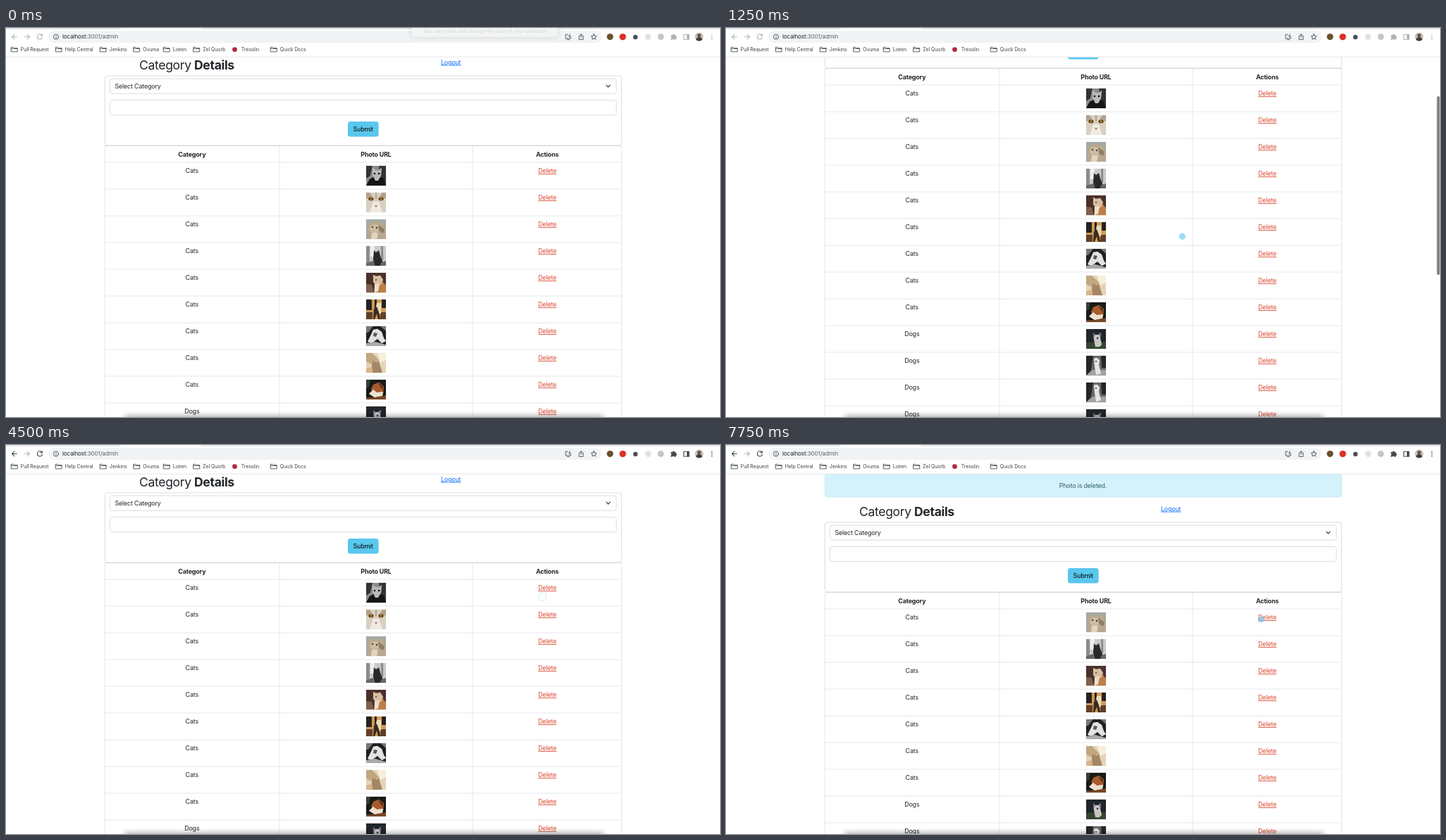
These frames come from a looping animation (1013 px wide and 553 px high, 8000 ms). An HTML page:

```html
<!DOCTYPE html>
<html lang="en">
<head>
<meta charset="utf-8">
<title>Category admin</title>
<style>
html, body { margin: 0; width: 100%; height: 100%; overflow: hidden; background: #fff; }
svg { display: block; width: 1013px; height: 553px; }
text { font: 400 8.9px Inter, sans-serif; letter-spacing: -.15px; fill: #212529; white-space: pre; }
.mid { text-anchor: middle; }
.bold { font-weight: 700; }
.link { text-decoration: underline; }
.title { font-size: 17.6px; letter-spacing: -.35px; }
.url { font-size: 8.1px; letter-spacing: -.12px; }
.mark { font-size: 6.9px; letter-spacing: -.05px; fill: #3c4043; }
.line { fill: none; stroke: #dee2e6; stroke-width: .8; }
.box { fill: #fff; stroke: #d0d5da; stroke-width: .8; }
.icon { fill: none; stroke: currentColor; stroke-width: 1.1; stroke-linecap: round; stroke-linejoin: round; }
#chrome { color: #4b4f54; }
</style>
</head>
<body>
<svg id="stage" viewBox="0 0 1013 553" xmlns="http://www.w3.org/2000/svg">
<defs>
  <clipPath id="view"><rect y="41.5" width="1013" height="512"/></clipPath>
  <filter id="soft"><feGaussianBlur stdDeviation=".45"/></filter>
  <filter id="shade" x="-10%" y="-100%" width="120%" height="300%"><feGaussianBlur stdDeviation="4"/></filter>

  <symbol id="p0" viewBox="0 0 28 28"><rect width="28" height="28" fill="#8b8b8b"/><g filter="url(#soft)">
    <path fill="#333" d="M0 0H9L6 14 0 18ZM18 0H28V28H22Z"/><path fill="#151515" d="M0 28 5 19 12 15 24 17 28 28Z"/>
    <path fill="#b9b9b9" d="M9 2 13 6H18L22 3 21 14 17 21H13L9 13Z"/><circle cx="12" cy="11" r="1.3"/><circle cx="18" cy="11" r="1.3"/></g></symbol>
  <symbol id="p1" viewBox="0 0 28 28"><rect width="28" height="28" fill="#d9cfc1"/><g filter="url(#soft)">
    <path fill="#b3a18b" d="M0 0H5L9 6 0 9ZM28 0H23L19 6 28 9ZM13 0H15V9H13Z"/><path fill="#f0ebe2" d="M10 13H18L23 28H5Z"/>
    <ellipse cx="7" cy="9" rx="3.6" ry="2.4" fill="#5b4019"/><ellipse cx="21" cy="9" rx="3.6" ry="2.4" fill="#5b4019"/>
    <circle cx="7" cy="9" r="1.3" fill="#c59436"/><circle cx="21" cy="9" r="1.3" fill="#c59436"/><path fill="#a66c5d" d="M12 18H16L14 21Z"/></g></symbol>
  <symbol id="p2" viewBox="0 0 28 28"><rect width="28" height="28" fill="#a3aaa5"/><g filter="url(#soft)">
    <path fill="#b9a88c" d="M4 28 2 16 5 5 12 3 22 5 28 11V28Z"/><ellipse cx="12" cy="13" rx="7" ry="6" fill="#cbbda5"/>
    <path fill="#8f7d63" d="M17 8 26 14 24 20 18 16Z"/><circle cx="9" cy="11" r="1.2" fill="#4c3c25"/><circle cx="15" cy="12" r="1.2" fill="#4c3c25"/><path fill="#e0d5c2" d="M8 19 17 19 15 28H7Z"/></g></symbol>
  <symbol id="p3" viewBox="0 0 28 28"><rect width="28" height="28" fill="#c9c9c9"/><g filter="url(#soft)">
    <path fill="#8c8c8c" d="M0 0H5V28H0ZM21 0H24V20H21Z"/><path fill="#eee" d="M6 0H12V15H6Z"/>
    <path fill="#292929" d="M11 6 14 9 18 6 20 14 24 24 19 28H12L10 19Z"/><path fill="#666" d="M0 24 10 21 13 28H0ZM21 23 28 21V28H20Z"/></g></symbol>
  <symbol id="p4" viewBox="0 0 28 28"><rect width="28" height="28" fill="#4b302a"/><g filter="url(#soft)">
    <path fill="#80604e" d="M0 16 8 17 11 28H0Z"/><path fill="#bc7f49" d="M11 28 12 16 23 12 28 18V28Z"/>
    <path fill="#d9bfa2" d="M10 3 14 5 20 4 24 10 21 17 14 18 10 13Z"/><path fill="#ede0ce" d="M12 16 19 15 17 26 12 28Z"/><circle cx="14" cy="10" r="1" fill="#453325"/></g></symbol>
  <symbol id="p5" viewBox="0 0 28 28"><rect width="28" height="28" fill="#cf9c55"/><g filter="url(#soft)">
    <path fill="#25211f" d="M0 0H8V15H0ZM12 0H15V13H12ZM22 0H28V12H22Z"/><path fill="#5f4028" d="M0 18H9V28H0ZM20 18H28V28H20Z"/>
    <path fill="#eadbb9" d="M15 5H21V20H12Z"/><path fill="#3a2a20" d="M11 13 15 10 18 18 20 28H17L15 20 12 28H10Z"/></g></symbol>
  <symbol id="p6" viewBox="0 0 28 28"><rect width="28" height="28" fill="#202020"/><g filter="url(#soft)">
    <path fill="#777" d="M0 0H10L3 9H0ZM20 0H28V7Z"/><path fill="#e2e2e2" d="M7 12 10 5 16 4 22 8 25 17 28 21 22 24 16 18 8 24 2 22Z"/>
    <path fill="#aaa" d="M0 24 13 22 28 26V28H0Z"/><path fill="#555" d="M11 9 16 10 14 15 10 14Z"/></g></symbol>
  <symbol id="p7" viewBox="0 0 28 28"><rect width="28" height="28" fill="#e4d3b5"/><g filter="url(#soft)">
    <path fill="#c0a681" d="M0 0H8L18 10 10 17 0 12Z"/><path fill="#f7eedb" d="M15 0H28V10L20 14Z"/>
    <path fill="#a68567" d="M9 28 8 18 10 11 14 14 18 11 20 19 23 28Z"/><path fill="#d6b586" d="M0 22 8 20 9 28H0Z"/></g></symbol>
  <symbol id="p8" viewBox="0 0 28 28"><rect width="28" height="28" fill="#171b17"/><g filter="url(#soft)">
    <path fill="#344330" d="M0 0H6L4 10 0 12Z"/><path fill="#a75b2d" d="M7 14 10 7 18 4 25 9 24 19 16 22Z"/>
    <path fill="#eee0ce" d="M4 20 10 14 15 18 24 17 23 23 12 25Z"/><path fill="#53301e" d="M17 5 24 9 23 14Z"/><path fill="#774728" d="M0 25 12 25 28 22V28H0Z"/></g></symbol>
  <symbol id="p9" viewBox="0 0 28 28"><rect width="28" height="28" fill="#20262b"/><g filter="url(#soft)">
    <path fill="#34462e" d="M0 19 28 18V28H0Z"/><path fill="#c9c5c5" d="M10 6 13 8 17 8 21 5 20 13 22 22 19 25H13L11 15Z"/>
    <path fill="#786a80" d="M10 5 13 8 11 12ZM21 5 18 8 20 12Z"/><circle cx="16" cy="13" r="1.3" fill="#363039"/></g></symbol>
  <symbol id="p10" viewBox="0 0 28 28"><rect width="28" height="28" fill="#68686a"/><g filter="url(#soft)">
    <path fill="#252628" d="M0 0H10L7 21 0 28ZM21 0H28V17H22Z"/><path fill="#a1a1a1" d="M0 28 9 20H28V28Z"/>
    <path fill="#e6e5e2" d="M11 4 15 3 19 6 18 13 21 25 14 27 12 15Z"/><circle cx="14" cy="8" r="1" fill="#292929"/></g></symbol>
</defs>
<rect width="1013" height="553" fill="#fff"/>

<g clip-path="url(#view)">
  <g id="alert">
    <rect x="140.3" y="41.6" width="733.2" height="32.2" rx="3.5" fill="#d4f2fb" stroke="#bde8f4" stroke-width=".8"/>
    <text class="mid" x="506.5" y="61" style="fill:#2f5c68">Photo is deleted.</text>
  </g>
  <g id="page">
    <text class="title" x="189" y="59">Category</text>
    <text class="title bold" x="267" y="59">Details</text>
    <text class="link" x="617" y="51.6" style="fill:#0d6efd">Logout</text>
    <rect class="box" x="140.3" y="68" width="733.2" height="99" rx="3.5"/>
    <rect class="box" x="147.5" y="72" width="718.5" height="21.2" rx="3.5"/>
    <text x="154.5" y="85.9">Select Category</text>
    <path class="icon" d="M851.7 81.2 854.4 84 857.1 81.2" style="color:#343a40"/>
    <rect class="box" x="147.5" y="102.5" width="718.5" height="21.2" rx="3.5"/>
    <rect x="485" y="133" width="43.6" height="21.5" rx="3.5" fill="#5ac7ed"/>
    <text class="mid" x="506.7" y="147" style="fill:#000">Submit</text>
    <g id="table"></g>
  </g>
</g>
<rect x="168" y="552" width="680" height="9" rx="4" fill="#000" opacity=".42" filter="url(#shade)"/>
<rect id="bar" x="1008.6" width="4" height="254" rx="2" fill="#7f7f7f"/>

<g id="chrome">
  <rect width="1013" height="1.6" fill="#dee1e6"/><rect x="163" width="114" height="1.6" fill="#fff"/>
  <rect x="60" y="4" width="785" height="17" rx="8.5" fill="#f1f3f4"/>
  <path d="M0 41.2H1013" stroke="#dfe1e4" stroke-width=".8"/>
  <g class="live icon">
    <path id="back" d="M15.4 12.5H8.6M11.8 9.2 8.5 12.5 11.8 15.8"/>
    <path d="M50.7 10A3.6 3.6 0 1 0 51.5 13.3M51.3 8.6V10.9H49"/>
  </g>
  <path class="icon" style="color:#b3b6ba" d="M26.6 12.5H33.4M30.2 9.2 33.5 12.5 30.2 15.8"/>
  <g class="icon" style="stroke-width:.9">
    <circle cx="71" cy="12.6" r="3.6"/><path d="M71 12.3V14.4M71 10.7V10.8"/>
    <path d="M797 9.3H794V15H801.3V13.2M796.2 16.7H799.2M799.8 8.8V12.5M798.2 11.2 799.8 12.8 801.4 11.2"/>
    <path d="M814.2 11.2H813V16.4H819V11.2H817.8M816 13.6V8.6M814.4 10.1 816 8.5 817.6 10.1"/>
    <path d="M834 8.6 835.2 11.2 838 11.5 835.9 13.3 836.5 16.1 834 14.7 831.5 16.1 832.1 13.3 830 11.5 832.8 11.2Z"/>
  </g>
  <text class="url" x="80" y="15.4">localhost<tspan fill="#5f6368">:3001/admin</tspan></text>
  <circle cx="857" cy="12.6" r="4.6" fill="#66512e"/>
  <circle cx="875" cy="12.6" r="4.7" fill="#dc2f25"/>
  <circle cx="893" cy="13" r="3.2" fill="#4c5055"/>
  <circle cx="911" cy="12.6" r="4.3" fill="#e0e2e5"/>
  <circle cx="929" cy="12.6" r="4.5" fill="#c3c5c8"/>
  <g class="live">
    <path fill="currentColor" d="M943.3 10H945.5A1.5 1.5 0 0 1 948.5 10H950.4V12A1.5 1.5 0 0 1 950.4 15V16.8H948.3A1.5 1.5 0 0 0 945.4 16.8H943.3V14.7A1.5 1.5 0 0 0 943.3 12Z"/>
    <path class="icon" d="M961.7 9.2H969V16.2H961.7Z"/><path fill="currentColor" d="M966 9H969.2V16.4H966Z"/>
    <g fill="currentColor"><circle cx="1001.5" cy="9.6" r=".9"/><circle cx="1001.5" cy="12.6" r=".9"/><circle cx="1001.5" cy="15.6" r=".9"/></g>
  </g>
  <circle cx="983.4" cy="12.6" r="6" fill="#c9c0bc"/>
  <path fill="#453b3a" d="M978.8 16.4Q980 13 983.4 13T988 16.4A6 6 0 0 1 978.8 16.4Z"/><circle cx="983.4" cy="10.6" r="2.6" fill="#6b554b"/>
  <g id="marks"></g>
</g>

<g id="toast">
  <rect x="575" y="-12" width="208" height="25" rx="5" fill="#000" opacity=".12" filter="url(#shade)"/>
  <rect x="575" y="-12" width="208" height="25" rx="5" fill="#f3f4f5" stroke="#e6e7e9" stroke-width=".6"/>
  <text class="mid" x="679.5" y="6.6" style="font-size:7.1px;letter-spacing:0;fill:#d3d5d8">You can move and change the size of your selection</text>
</g>
<circle id="ring" fill="#fff" stroke="#b4e0f2" stroke-width=".8"/>
<circle id="dot" r="4.6" fill="#5bc3ee"/>
</svg>
<script>
const LOOP = 8000, STEP = 250, CATS = 9, PHOTOS = 11, ROWS = 21;
const TOP = 191, ROW = 38, ALERT = 42;
const $ = id => document.getElementById(id);

// Each key: time, then the values to blend.
const scrollKeys = [[750, 0], [1000, 48], [1250, 110], [1500, 40], [1750, 0]];
const barKeys = [[500, 0], [750, 1], [2000, 1], [2500, 0]];
const dotKeys = [
  [250, 574, 331, 0], [500, 574, 331, .6], [1000, 574, 331, .6], [1750, 794, 227, .6],
  [2750, 775, 214, .6], [3750, 763, 205, .6], [4000, 763, 205, .4], [4250, 763, 205, .4],
  [4500, 761, 216, 0], [4750, 761, 212, 0], [5250, 760, 247, .55], [6000, 760, 248, .55],
  [6250, 760, 260, 0], [6500, 764, 258, 0], [6750, 763, 256, .55], [7750, 759, 248, .55]
];
const clicks = [{ t: 4500, x: 761, y: 216 }, { t: 6250, x: 760, y: 260 }];
const deletions = [4750, 6250];

function track(keys, t) {
  const i = keys.findIndex(k => k[0] > t);
  if (i === 0) return keys[0].slice(1);
  if (i < 0) return keys[keys.length - 1].slice(1);
  const a = keys[i - 1], b = keys[i], p = (t - a[0]) / (b[0] - a[0]);
  return a.slice(1).map((v, n) => v + (b[n + 1] - v) * p);
}

function set(id, attrs) {
  for (const name in attrs) $(id).setAttribute(name, attrs[name]);
}

const label = (x, y, s, cls = '', fill = '') =>
  `<text class="mid ${cls}" x="${x}" y="${y}"${fill && ` style="fill:${fill}"`}>${s}</text>`;

function buildTable() {
  const end = TOP + ROW * ROWS;
  let out = [140.3, 387.9, 662, 873.5].map(x => `<path class="line" d="M${x} 167.5V${end}"/>`).join('');
  out += '<path class="line" d="M140.3 167.5H873.5" style="stroke:#cfd3d7"/>';
  out += label(263.8, 183, 'Category', 'bold') + label(525, 183, 'Photo URL', 'bold') + label(768, 183, 'Actions', 'bold');
  for (let i = 0; i < ROWS; i++) {
    const y = TOP + i * ROW;
    out += `<path class="line" d="M140.3 ${y}H873.5"/>` + label(263.8, y + 15.2, '', 'kind') +
      `<use class="photo" x="510.8" y="${y + 4.8}" width="28.4" height="28.4"/>` +
      label(768, y + 15.2, 'Delete', 'link', '#da4a33');
  }
  $('table').innerHTML = out;
}

function buildMarks() {
  const marks = [[7, 'Pull Request'], [70, 'Help Central'], [133, 'Jenkins'], [180.5, 'Ovuma'], [223, 'Listen'],
    [265.5, 'Zel Quorb'], [320, 'Tresolin', true], [375, 'Quick Docs']];
  $('marks').innerHTML = marks.map(([x, name, logo]) =>
    (logo ? `<circle cx="${x + 4.5}" cy="30.6" r="3.4" fill="#b3293f"/>`
      : `<path class="icon" style="stroke-width:.9" d="M${x + .6} 27.4h3l1 1.2h4.6v5.2h-8.6ZM${x + .6} 29.4h8.4"/>`) +
    `<text class="mark" x="${x + 13.8}" y="33">${name}</text>`).join('');
}

let shown = -1;
function fillRows(gone) {
  if (gone === shown) return;
  shown = gone;
  const kinds = document.querySelectorAll('.kind');
  document.querySelectorAll('.photo').forEach((photo, i) => {
    const n = i + gone;
    photo.setAttribute('href', '#p' + (n < PHOTOS ? n : CATS + n % 2));
    kinds[i].textContent = n < CATS ? 'Cats' : 'Dogs';
  });
}

function render(time) {
  const t = Math.floor(time % LOOP / STEP) * STEP;
  const gone = deletions.filter(d => t >= d).length;
  const [scroll] = track(scrollKeys, t);
  const [x, y, alpha] = track(dotKeys, t);
  const click = clicks.find(c => t >= c.t && t < c.t + 2 * STEP);
  const fresh = click && t === click.t;

  fillRows(gone);
  set('page', { transform: `translate(0 ${(gone ? ALERT : 0) - scroll})` });
  set('alert', { opacity: gone ? 1 : 0 });
  set('bar', { y: 42 + scroll / 2, opacity: track(barKeys, t)[0] });
  set('toast', { opacity: t < STEP ? 1 : 0 });
  set('dot', { cx: x, cy: y, opacity: alpha });
  set('ring', click
    ? { cx: click.x, cy: click.y, r: fresh ? 5.7 : 7, opacity: fresh ? .9 : .12 }
    : { r: 0, opacity: 0 });
  const tone = t < 3250 ? '#b0b3b7' : '#46494e';
  document.querySelectorAll('.live').forEach(el => { el.style.color = tone; });
}

buildTable();
buildMarks();
const start = performance.now();
function tick() {
  render(performance.now() - start);
  requestAnimationFrame(tick);
}
tick();
</script>
</body>
</html>
```
